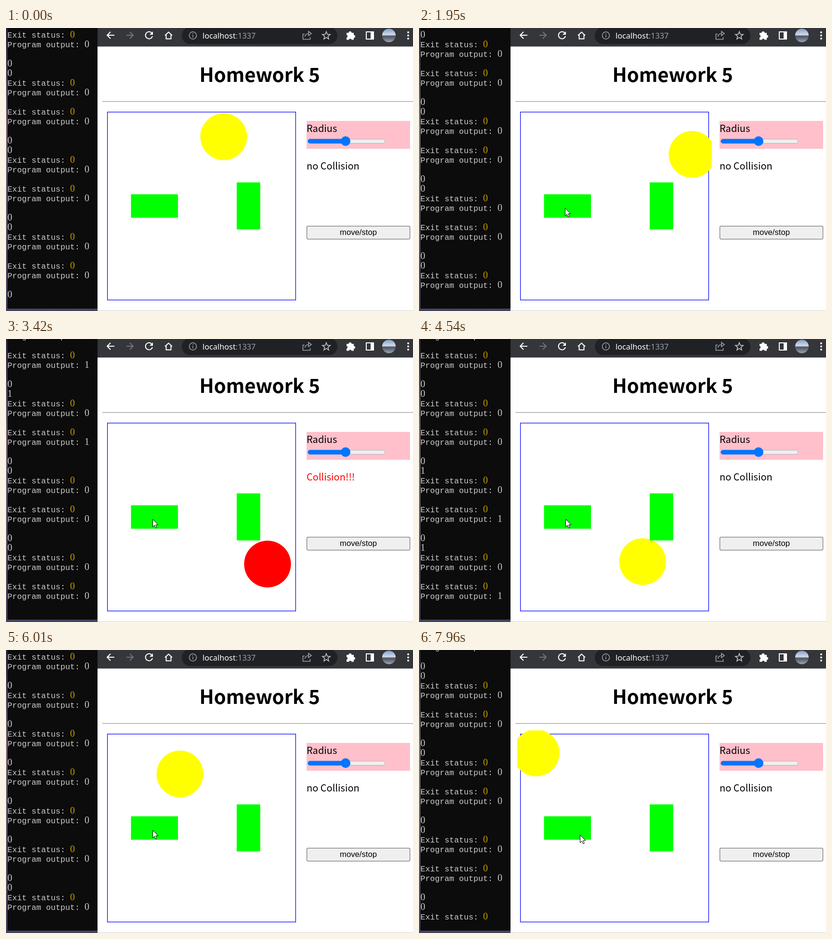
An HTML page with a canvas for the animation above (8000 ms loop, 845 by 588 pixels).

```html
<!DOCTYPE html>
<html lang="en">
<head>
<meta charset="utf-8">
<title>Homework 5</title>
<style>
  html, body { margin: 0; width: 100%; height: 100%; overflow: hidden; background: #fff; }
  svg, canvas { position: absolute; left: 0; top: 0; }
  .page { font: 20px "Noto Sans CJK TC", "Noto Sans CJK JP", "Noto Sans CJK SC", "Noto Sans", sans-serif; }
  .title { font-size: 40px; font-weight: 700; text-anchor: middle; }
  .url { font: 16.3px "Noto Sans", "Open Sans", sans-serif; }
  .button { font: 16.67px "Liberation Sans", Arial, sans-serif; text-anchor: middle; }
  .icon { fill: none; stroke: #fff; stroke-width: 2; }
  .solid { fill: #fff; stroke: none; }
  .faint { stroke: #9aa0a6; stroke-width: 1.6; }
</style>
</head>
<body>
<svg width="845" height="588" viewBox="0 0 845 588">
  <defs>
    <linearGradient id="desktop" x2="0" y2="1">
      <stop stop-color="#2c2940"/><stop offset=".35" stop-color="#85707f"/><stop offset="1" stop-color="#45435f"/>
    </linearGradient>
    <linearGradient id="avatar" x2="0" y2="1">
      <stop stop-color="#7f9ccb"/><stop offset=".45" stop-color="#d5dce6"/>
      <stop offset=".55" stop-color="#4b5262"/><stop offset="1" stop-color="#9aa5b5"/>
    </linearGradient>
    <clipPath id="view"><path d="M204 167H608V572H204Z"/></clipPath>
  </defs>
  <path fill="url(#desktop)" d="M0 0H190V588H0Z"/>
  <path fill="#fff" d="M190 38H845V588H190Z"/>
  <path fill="#d0d0d0" d="M190 587H845V588H190Z"/>

  <path fill="#35363a" d="M190 0H845V38.5H190Z"/>
  <rect x="365" y="-2" width="323" height="35.5" rx="17.5" fill="#202124"/>
  <g class="icon">
    <path d="M225 15H211M217 8L210 15L217 22"/>
    <path stroke="#77707c" d="M250 15H264M257 8L264 15L257 22"/>
    <path d="M303 11A7.3 7.3 0 1 0 304 17"/><path class="solid" d="M305 7V14H298Z"/>
    <path d="M330 15.5L337.5 8.5L345 15.5M332.5 14V22.5H342.5V14"/>
    <g class="faint">
      <circle cx="388" cy="15.5" r="7.5"/><path d="M388 14.5V19.5M388 11V12.8"/>
      <path d="M620 12.5H616.5V23.5H631.5V19M620.5 18Q622 11.5 629 11.5M628 7L634 11.5L628 16Z"/>
    </g>
    <path id="star" stroke="#c4c7cb" stroke-width="1.6"/>
    <path class="solid" d="M707 10H711.5A3 3 0 0 1 717.5 10H722V14.5A3 3 0 0 1 722 20.5V24.5H717.5A2.8 2.8 0 0 0 712 24.5H707V20A2.8 2.8 0 0 0 707 14.5Z"/>
    <path d="M748 8H763V23H748Z"/><path class="solid" d="M757 8H763V23H757Z"/>
    <path stroke-width="4" stroke-linecap="round" stroke-dasharray="0 6.5" d="M835 9V22.5"/>
  </g>
  <circle cx="795" cy="15.5" r="14" fill="url(#avatar)"/>
  <text class="url" x="408" y="21.5" fill="#fff">localhost<tspan fill="#9aa0a6">:1337</tspan></text>

  <g class="page">
    <text class="title" x="526.7" y="112">Homework 5</text>
    <path fill="#999" d="M200 152H845V153.3H200Z"/>
    <path fill="#ffc0cb" d="M624 193H839V251H624Z"/>
    <text x="624" y="216">Radius</text>
    <rect x="627" y="231" width="160" height="8.5" rx="4.2" fill="#efefef" stroke="#b2b2b2"/>
    <rect x="626.5" y="230.5" width="85" height="9.5" rx="4.7" fill="#0075ff"/>
    <circle cx="705" cy="235" r="10" fill="#0075ff"/>
    <text id="status" x="624" y="294"></text>
  </g>
  <rect x="624.6" y="411.6" width="214" height="27" rx="2.5" fill="#efefef" stroke="#767676" stroke-width="1.25"/>
  <text class="button" x="731.5" y="430">move/stop</text>

  <path fill="none" stroke="#00f" stroke-width="1.25" d="M210.6 174.6H601.4V565.2H210.6Z"/>
  <g clip-path="url(#view)"><circle id="ball"/></g>
  <path id="blocks" fill="#0f0"/>
  <path id="cursor" fill="#fff" stroke="#000" d="M.5 .5V16.5L4.2 13L6.7 18.7L9.3 17.6L6.8 12H11.8Z"/>
</svg>
<canvas id="console" width="187" height="583" style="left:3px"></canvas>

<script>
const LOOP = 8000, STEP = 70, ROWS = 28, RADIUS = 48.6;
const STATUS_LAG = 150; // the page shows a hit late
const LOG_LEAD = 140;   // the console reports it early
const ROUND = 8, LINES_PER_STEP = 9, FIRST_LINES = 33;
const $ = id => document.getElementById(id);
const ctx = $("console").getContext("2d");

const blocks = [
  { x: 259.5, y: 345.5, w: 97.5, h: 48.8 },
  { x: 479, y: 320.8, w: 48.8, h: 97.6 }
];
$("blocks").setAttribute("d", blocks.map(b => `M${b.x} ${b.y}h${b.w}v${b.h}h${-b.w}z`).join(""));

const starPoint = (_, i) => {
  const angle = i * Math.PI / 5, r = i % 2 ? 3.6 : 8.5;
  return `${665 + r * Math.sin(angle)} ${16 - r * Math.cos(angle)}`;
};
$("star").setAttribute("d", `M${Array.from({ length: 10 }, starPoint).join("L")}Z`);

// Constant speed between two walls; a knock reverses the direction.
function bounce(t, offset, speed, low, high, knocks) {
  let phase = offset, last = 0;
  for (const knock of knocks.filter(k => k < t)) {
    phase = -(phase + speed * (knock - last));
    last = knock;
  }
  phase += speed * (t - last);
  const span = high - low, period = 2 * span;
  const p = (phase % period + period) % period;
  return low + Math.min(p, period - p);
}

const ballAt = t => ({
  x: bounce(t, 218.3, 0.0702, 233.7, 578, [2358]),
  y: bounce(t, -29, 0.1395, 197, 543.2, [844, 7262])
});

function touches(t, block) {
  const { x, y } = ballAt(t);
  const gap = (v, from, size) => v - Math.min(Math.max(v, from), from + size);
  return Math.hypot(gap(x, block.x, block.w), gap(y, block.y, block.h)) < RADIUS;
}

// Linear travel through points of [time, ...values].
function along(points, t) {
  let i = 1;
  while (i < points.length - 1 && t > points[i][0]) i++;
  const [t0, ...a] = points[i - 1], [t1, ...b] = points[i];
  const k = Math.min(1, Math.max(0, (t - t0) / (t1 - t0)));
  return a.map((v, j) => v + (b[j] - v) * k);
}

const cursorPath = [[970, 380, 450], [1040, 352, 439], [1400, 299, 374], [2100, 304, 374],
  [7700, 304, 374], [7960, 334, 384]];
const scroll = [[0, 0], [28, 252], [49, 439], [86, 772], [114, 1026]]; // steps, lines

// One round checks both blocks; now and then the replies arrive one by one.
function logRound(k) {
  const time = (k * ROUND - FIRST_LINES) / LINES_PER_STEP * STEP + LOG_LEAD;
  const results = blocks.map(b => time > 0 && touches(time, b) ? "1" : "0");
  const digits = results.map(r => [["", r]]);
  const reports = results.map(r => [["Exit status:", "0"], ["Program output:", r], ["", ""]]);
  const oneByOne = k % 50 > 44;
  return (oneByOne ? [digits[0], reports[0], digits[1], reports[1]] : [...digits, ...reports]).flat();
}
const log = Array.from({ length: 140 }, (_, k) => logRound(k)).flat();

function drawConsole(step) {
  const first = FIRST_LINES + Math.floor(along(scroll, step)[0] + 0.01) - ROWS;
  ctx.fillStyle = "#0c0c0c";
  ctx.fillRect(0, 0, 187, 583);
  for (let row = -1; row < ROWS; row++) {
    const [label, digit] = log[first + row];
    const y = 20 + row * 20;
    ctx.fillStyle = "#ccc";
    ctx.font = '16.67px "Liberation Mono", monospace';
    ctx.fillText(label, 0, y);
    if (label.startsWith("Exit")) ctx.fillStyle = "#c19c00";
    ctx.font = '20px "Liberation Serif", serif';
    ctx.fillText(digit, label && (label.length + 1) * 10, y);
  }
}

function draw(now) {
  // The picture advances in 70 ms steps, two of them 10 ms short.
  const shift = now < 400 ? 0 : now < 6400 ? 10 : 20;
  const step = Math.floor((now + shift + 2) / STEP);
  const t = step * STEP - shift;

  const hit = t > STATUS_LAG && blocks.some(b => touches(t - STATUS_LAG, b));
  const { x, y } = ballAt(t);
  const [cx, cy] = along(cursorPath, t);
  const set = (id, attributes) => {
    for (const name in attributes) $(id).setAttribute(name, attributes[name]);
  };
  set("ball", { cx: x, cy: y, r: RADIUS, fill: hit ? "#f00" : "#ff0" });
  set("status", { fill: hit ? "#f00" : "#000" });
  $("status").textContent = hit ? "Collision!!!" : "no Collision";
  set("cursor", { visibility: t < 970 ? "hidden" : "visible", transform: `translate(${cx} ${cy})` });
  drawConsole(step);
}

const start = performance.now();
function tick() {
  draw((performance.now() - start) % LOOP);
  requestAnimationFrame(tick);
}
tick();
</script>
</body>
</html>
```
